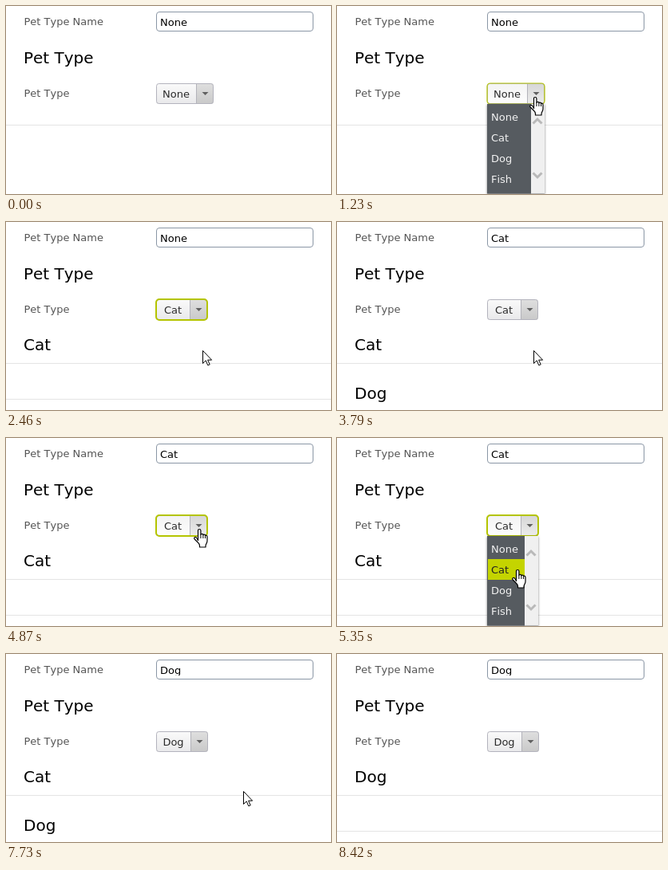
An HTML page for the animation above (9.2 s loop, 407 px wide and 236 px high).

```html
<!DOCTYPE html>
<html lang="en">
<head>
<meta charset="utf-8">
<title>Pet type picker</title>
<style>
html, body { margin: 0; width: 100%; height: 100%; overflow: hidden; background: #fff; }
svg { display: block; width: 407px; height: 236px; }
text { font: 13px "DejaVu Sans", sans-serif; font-kerning: none; fill: #000; white-space: pre; }
.label { fill: #555; }
.head { font-size: 20px; }
.rule { fill: #e4e4e4; }
#value { fill: #2b2b2b; text-anchor: middle; }
#list text { fill: #f2f2f2; }
#list text.on { fill: #222; }
#list { filter: drop-shadow(0 1px 1.5px rgba(0, 0, 0, .5)); }
.chevron { fill: none; stroke: #b9b9b9; stroke-width: 3; }
#ring { fill: none; stroke: #b4c400; }
.cursor { fill: #fff; stroke: #000; stroke-linejoin: round; }
</style>
</head>
<body>
<svg viewBox="0 0 407 236">
  <defs>
    <linearGradient id="face" x2="0" y2="1"><stop stop-color="#fafafa"/><stop offset="1" stop-color="#e9e9eb"/></linearGradient>
    <linearGradient id="faceLit" x2="0" y2="1"><stop stop-color="#f3f3f3"/><stop offset="1" stop-color="#fdfdfd"/></linearGradient>
    <linearGradient id="side" x2="0" y2="1"><stop stop-color="#dfdfdf"/><stop offset="1" stop-color="#c9c9c9"/></linearGradient>
    <linearGradient id="sideLit" x2="0" y2="1"><stop stop-color="#d6d6d6"/><stop offset="1" stop-color="#ececec"/></linearGradient>
    <clipPath id="field"><rect x="190" y="9" width="193" height="18"/></clipPath>
    <clipPath id="button"><rect id="buttonClip" x="188" y="97" height="26" rx="3.5"/></clipPath>
  </defs>

  <text class="label" x="22.5" y="24">Pet Type Name</text>
  <rect x="188.5" y="7.5" width="196" height="24" rx="3.5" fill="#fff" stroke="#8b97a6"/>
  <text id="input" x="193" y="25" clip-path="url(#field)"></text>
  <text class="head" x="22" y="72">Pet Type</text>
  <text class="label" x="22.5" y="114">Pet Type</text>
  <text class="head" id="first" x="22" y="161"></text>
  <text class="head" id="second" x="22" y="222"></text>
  <rect class="rule" id="rule1" width="407" height="1"/>
  <rect class="rule" id="rule2" y="222" width="407" height="1"/>

  <g clip-path="url(#button)">
    <rect id="main" x="188" y="97" height="26"/>
    <rect id="drop" y="97" width="22" height="26"/>
    <rect id="split" y="97" width="1" height="26" fill="#b3b3ba"/>
  </g>
  <rect id="edge" x="188.5" y="97.5" height="25" rx="3" fill="none" stroke="#b3b3bd"/>
  <rect id="ring" x="188" y="97" height="26" rx="4"/>
  <path id="arrow" d="M-4 0h8l-4 4z" fill="#606060"/>
  <text id="value" y="115"></text>

  <g id="list">
    <rect id="panel" x="188" y="123" height="112.5" fill="#565b60"/>
    <rect id="bar" y="123" width="17" height="112.5" fill="#f0f0f0"/>
    <g id="chevrons">
      <path class="chevron" d="M-5.5 147.5l5.5-5.5 5.5 5.5"/>
      <path class="chevron" d="M-5.5 209.5l5.5 5.5 5.5-5.5"/>
    </g>
    <rect id="mark" x="189" height="26" fill="#c4d400"/>
  </g>

  <path class="cursor" id="pointer" d="M.5 .5v16l3.7-3.6 2.6 6 2.4-1-2.6-5.7h5z"/>
  <g class="cursor" id="hand">
    <path stroke-width="1.2" d="M5.5 14.5V2.3q0-1.8 1.7-1.8t1.7 1.8V7.5q0-1.2 1.4-1.2 1.5 0 1.6 1.5 .2-.8 1.3-.7 1.4 .1 1.4 1.5 .3-.6 1-.5 1.4 .2 1.4 1.8V15q0 2-1.2 3.8-.8 1.2-.8 2.6v1.6H7.5v-1.8Q7.4 19 5.2 17L1.2 13Q0 11.5 1.3 10.7 2.4 10 3.6 11.2z"/>
    <path fill="none" d="M8.9 7.5v4.5M11.9 8v4M14.6 8.7v3.3"/>
  </g>
</svg>
<script>
const LOOP = 9200;
const $ = id => document.getElementById(id);
const set = (id, attrs) => { for (const k in attrs) $(id).setAttribute(k, attrs[k]); };
const show = (id, on) => set(id, { visibility: on ? 'visible' : 'hidden' });

const splits = { None: 238, Cat: 230, Dog: 231 };
const rowTop = i => Math.round(126.4 + i * 25.7);

const rows = ['None', 'Cat', 'Dog', 'Fish'].map((name, i) => {
  const row = document.createElementNS('http://www.w3.org/2000/svg', 'text');
  row.textContent = name;
  row.setAttribute('x', 193);
  row.setAttribute('y', rowTop(i) + 18.5 | 0);
  return $('list').appendChild(row);
});

// Form changes, each kept until overridden
const changes = [
  [0, { input: 'None', value: 'None', first: '', second: '', ring: 0, open: false }],
  [1060, { ring: 1.2 }],
  [1150, { open: true }],
  [1300, { ring: 2 }],
  [2080, { value: 'Cat', first: 'Cat', open: false }],
  [3790, { input: 'Cat', second: 'Dog', ring: 0 }],
  [3870, { second: '' }],
  [4860, { ring: 2 }],
  [4930, { open: true }],
  [5860, { value: 'Dog', first: 'Dog', open: false }],
  [7730, { input: 'Dog', first: 'Cat', second: 'Dog', ring: 0 }],
  [7810, { first: 'Dog', second: '' }]
];

// Cursor moves: first step, last step, step count, x, y
const moves = [
  [600, 990, 6, 246, 114],
  [1530, 1950, 6, 222, 163],
  [2390, 2460, 2, 246, 161],
  [4480, 4780, 5, 240, 114],
  [5020, 5350, 6, 224, 165],
  [5400, 5400, 1, 224, 168],
  [5480, 5710, 4, 222, 191],
  [5940, 5940, 1, 220, 190],
  [6090, 6250, 3, 297, 172],
  [8040, 8040, 1, 297, 170],
  [8270, 8420, 3, 341, 240]
];

function cursorAt(t) {
  let x = 318, y = 240;
  for (const [from, to, n, tx, ty] of moves) {
    if (t < from) break;
    const done = t >= to ? 1 : (Math.floor((t - from) / (to - from) * (n - 1)) + 1) / n;
    x += (tx - x) * done;
    y += (ty - y) * done;
  }
  return [Math.round(x), Math.round(y)];
}

function draw(t) {
  const s = {};
  for (const [at, patch] of changes) if (t >= at) Object.assign(s, patch);
  const [x, y] = cursorAt(t);
  const split = splits[s.value], right = split + 22, width = right - 188;
  const inX = x >= 188 && x < right;
  const overButton = inX && y >= 97 && y < 123;
  const overList = s.open && inX && y >= 123;
  const lit = overButton || s.open;

  for (const id of ['input', 'value', 'first', 'second']) $(id).textContent = s[id];
  set('rule1', { y: s.first ? 177 : 149 });
  show('rule2', s.first && !s.second);

  set('buttonClip', { width });
  set('main', { width: split - 188, fill: lit ? 'url(#faceLit)' : 'url(#face)' });
  set('drop', { x: split, fill: lit ? 'url(#sideLit)' : 'url(#side)' });
  set('split', { x: split });
  set('edge', { width: width - 1 });
  set('ring', { width, 'stroke-width': s.ring });
  show('ring', s.ring);
  set('arrow', { transform: `translate(${right - 10.5} 108)` });
  set('value', { x: (188 + split) / 2 });

  show('list', s.open);
  set('panel', { width });
  set('bar', { x: right - 17 });
  set('chevrons', { transform: `translate(${right - 9} 0)` });
  const hover = overList && x < right - 17 ? rows.findIndex((r, i) => y >= rowTop(i) && y < rowTop(i + 1)) : -1;
  rows.forEach((row, i) => row.setAttribute('class', i === hover ? 'on' : ''));
  set('mark', { y: rowTop(hover), width: right - 17 - 189 });
  show('mark', hover >= 0);

  const hand = overButton || overList;
  show('hand', hand);
  show('pointer', !hand);
  set('hand', { transform: `translate(${x - 5} ${y})` });
  set('pointer', { transform: `translate(${x} ${y})` });
}

function tick() {
  draw(performance.now() % LOOP);
  requestAnimationFrame(tick);
}
tick();
</script>
</body>
</html>
```
